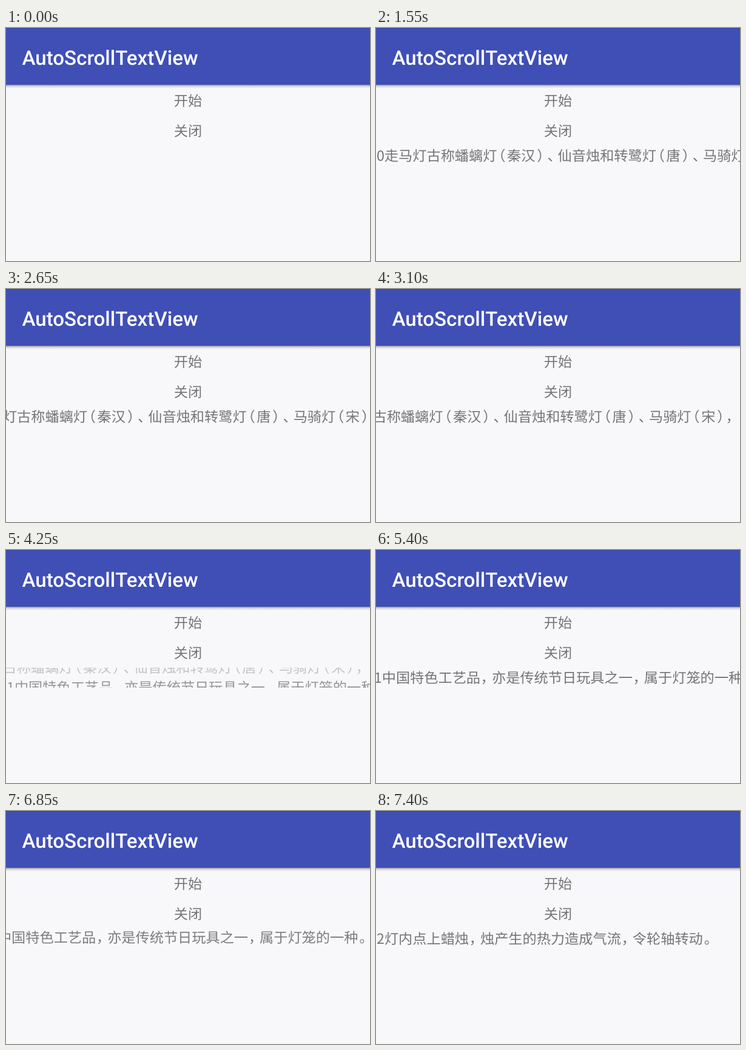
Write an HTML page that moves like this. It is 600 by 386 pixels and loops after 8 s.

```html
<!DOCTYPE html>
<html lang="zh-CN">
<head>
<meta charset="utf-8">
<title>AutoScrollTextView</title>
<style>
  html, body { margin: 0; width: 100%; height: 100%; overflow: hidden; background: #f8f7f9; }
  svg { display: block; width: 600px; height: 386px; }
  text { white-space: pre; text-rendering: geometricPrecision; text-spacing-trim: space-all; }
  .title { font: 500 33.1px Roboto, sans-serif; fill: #fff; }
  .body { font: 400 23.2px "Noto Sans CJK SC", "Noto Sans CJK", sans-serif; fill: #757576; }
</style>
</head>
<body>
<svg viewBox="0 0 600 386">
  <defs>
    <linearGradient id="shade" x1="0" y1="0" x2="0" y2="1">
      <stop offset="0" stop-color="#44464f" stop-opacity=".6"/>
      <stop offset=".4" stop-color="#44464f" stop-opacity=".19"/>
      <stop offset="1" stop-color="#44464f" stop-opacity="0"/>
    </linearGradient>
    <clipPath id="window"><rect y="195" width="600" height="33"/></clipPath>
  </defs>
  <rect width="600" height="386" fill="#f8f7f9"/>
  <rect y="94" width="600" height="6" fill="url(#shade)"/>
  <rect width="600" height="94" fill="#3f4fb5"/>
  <rect width="600" height="1" fill="#3747a3"/>
  <text class="title" x="26.5" y="60.8">AutoScrollTextView</text>
  <text class="body" x="276.8" y="129">开始</text>
  <text class="body" x="276.8" y="179">关闭</text>
  <g id="lines" clip-path="url(#window)"></g>
</svg>
<script>
const LOOP = 8000, STEP = 50;
const SLIDE = 550, TRAVEL = 33, LEFT = 1, BASE = 219.9;
const SPEED = 0.073; // horizontal px per ms

// enter / leave: start of the vertical slides; roll: start of the sideways scroll
const lines = [
  { text: '0走马灯古称蟠螭灯（秦汉）、仙音烛和转鹭灯（唐）、马骑灯（宋），',
    enter: 300, roll: 1755, shift: 89, leave: 3975 },
  { text: '1中国特色工艺品，亦是传统节日玩具之一，属于灯笼的一种。',
    enter: 3975, roll: 5343, shift: 28, leave: 6775 },
  { text: '2灯内点上蜡烛，烛产生的热力造成气流，令轮轴转动。',
    enter: 6775, roll: Infinity, shift: 0, leave: Infinity }
];

// Narrow punctuation: space added before and after each mark
const marks = {
  '（': [-9.2, 2.6],
  '）': [3, -9.6],
  '、': [3.5, -6],
  '，': [0.6, -4.8],
  '。': [2, -5]
};

function spacing(text) {
  let after = 0;
  return [...text].map(c => {
    const [before, next] = marks[c] || [0, 0];
    const dx = after + before;
    after = next;
    return dx.toFixed(1);
  }).join(' ');
}

const group = document.getElementById('lines');
for (const line of lines) {
  const el = document.createElementNS('http://www.w3.org/2000/svg', 'text');
  el.setAttribute('class', 'body');
  el.setAttribute('x', LEFT);
  el.setAttribute('y', BASE);
  el.setAttribute('dx', spacing(line.text));
  el.textContent = line.text;
  group.append(el);
  line.el = el;
}

const clamp = (v, lo, hi) => Math.min(hi, Math.max(lo, v));
const ease = p => 0.5 - 0.5 * Math.cos(Math.PI * clamp(p, 0, 1));

function draw(t) {
  for (const { el, enter, roll, shift, leave } of lines) {
    const come = ease((t - enter) / SLIDE);
    const go = ease((t - leave) / SLIDE);
    const x = -clamp((t - roll) * SPEED, 0, shift);
    const y = TRAVEL * (1 - come - go);
    const alpha = t < enter ? 0 : (0.5 + 0.5 * come) * Math.max(0, 1 - 1.2 * go);
    el.setAttribute('transform', `translate(${x} ${y})`);
    el.setAttribute('opacity', alpha);
  }
}

const start = performance.now();
function tick(now) {
  const t = Math.max(0, now - start) % LOOP;
  draw(Math.floor(t / STEP) * STEP);
  requestAnimationFrame(tick);
}
draw(0);
requestAnimationFrame(tick);
</script>
</body>
</html>
```
